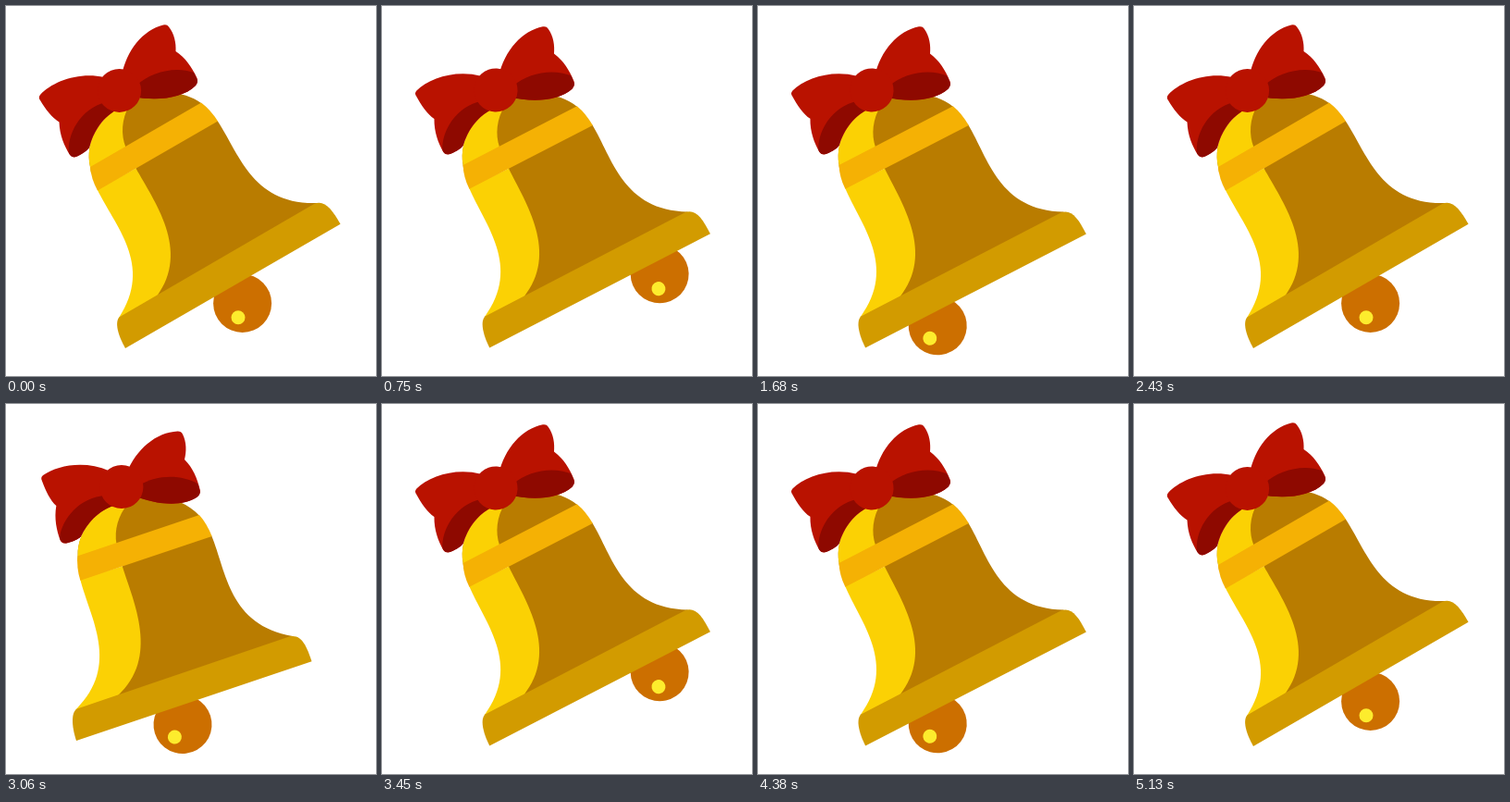
These frames come from a looping animation (400 by 400 pixels, 5400 ms). An HTML page with a canvas:

```html
<!DOCTYPE html>
<html lang="en">
<head>
<meta charset="utf-8">
<title>Ringing bell</title>
<style>
  html, body { margin: 0; width: 100%; height: 100%; overflow: hidden; background: #fff; }
  canvas { display: block; width: 400px; height: 400px; }
</style>
</head>
<body>
<canvas id="stage"></canvas>
<script>
const STEP = 30, STEPS = 90;
const PIVOT = [133, 102];

// [step, degrees] swing keys; the clapper swings relative to the bell
const BELL = [[0, 0], [9, 22], [19, -27], [29.5, 22], [40, -28], [51, 11], [61, -5.5], [75, 0]];
const CLAPPER = [[0, 0], [6, -15], [16, 15], [25, -15.2], [35.5, 15], [46, -15], [57, 13], [67, -4.7], [81, 0]];

const shape = (fill, d) => ({ fill, path: new Path2D(d) });

const DOME = 'M91 174 C85 146 101 120 130 105 ';
const bellShapes = [
  // dome
  shape('#b97c00', DOME + 'C165 88 193 92 211 105 L212 110 L92 180 Z'),
  shape('#fbd104', DOME + 'L133 108 C125 122 124 139 129.500 153 L129 158 L92 180 Z'),
  // body
  shape('#b97c00', 'M140 172 L228.500 124 C252 159 266 215 336 213 L336 220 L160 322 Z'),
  shape('#fbd104', 'M98.500 198 L140.500 175.500 C160 211 200 264 163 314 L160 322 L121 340 L122 337 C160 278 117 237 98.500 198 Z'
    .replace('C160 278 117 237', 'C160 280 117 237')),
  // band
  shape('#f5b104', 'M91 174 L211 104.500 Q221 112 229 124.500 L99 199.500 Q92 187 91 174 Z'),
  // rim
  shape('#d29b00', 'M129 370 L361.500 235.700 C352 219 344 209 333 214 L123 336 C117 341 121 356 129 370 Z')
];

const bowShapes = [
  // left loop
  shape('#b91200', 'M122 76 L106 77 C78 71 50 82 37 96 Q34.500 99 37 102 C43 112 50 121 57.500 125.500 C58 140 63 151 69 161 Q72 165 77 162.500 C84 159 88 156 90 153 C94 138 102 123 118 113 Z'),
  shape('#8e0900', 'M68 159 C66 139 80 111 108 104 L122 111 C105 119 94 135 90 153 C88 156 84 159 77 162.500 Q71 165 68 159 Z'),
  // right loop
  shape('#b91200', 'M125 76 C130 48 148 26 170 20.500 Q174 19.500 176 22.500 C182 30 184 40 183.500 49 C194 56 201 66 206.500 78 Q208 82 205 86 C191 100 163 103 139 98 Z'),
  shape('#8e0900', 'M141 86 C157 71 183 65 203 72 L206.500 79 Q208 82 205 86 C191 100 163 103 136 98 Z')
];

const canvas = document.getElementById('stage');
const ctx = canvas.getContext('2d');
const ratio = window.devicePixelRatio || 1;
canvas.width = canvas.height = 400 * ratio;

function valueAt(keys, t) {
  for (let i = 1; i < keys.length; i++) {
    const [t0, a] = keys[i - 1], [t1, b] = keys[i];
    if (t < t1) {
      const u = (t - t0) / (t1 - t0);
      return a + (b - a) * u * u * (3 - 2 * u);
    }
  }
  return keys[keys.length - 1][1];
}

function disc(x, y, r, fill) {
  ctx.fillStyle = fill;
  ctx.beginPath();
  ctx.arc(x, y, r, 0, Math.PI * 2);
  ctx.fill();
}

function swing(deg, paint) {
  const [x, y] = PIVOT;
  ctx.save();
  ctx.translate(x, y);
  ctx.rotate(deg * Math.PI / 180);
  ctx.translate(-x, -y);
  paint();
  ctx.restore();
}

function paintAll(shapes) {
  for (const s of shapes) {
    ctx.fillStyle = s.fill;
    ctx.fill(s.path);
  }
}

function draw(step) {
  ctx.setTransform(ratio, 0, 0, ratio, 0, 0);
  ctx.fillStyle = '#fff';
  ctx.fillRect(0, 0, 400, 400);
  swing(valueAt(BELL, step), () => {
    swing(valueAt(CLAPPER, step), () => {
      disc(255.6, 321.4, 31.5, '#cc6f00');
      disc(251, 336.7, 7.5, '#fdec2d');
    });
    paintAll(bellShapes);
    paintAll(bowShapes);
    disc(122.6, 91.4, 23.5, '#b91200');
  });
}

const start = performance.now();
function tick() {
  const t = Math.max(0, performance.now() - start);
  draw(Math.floor(t / STEP) % STEPS);
  requestAnimationFrame(tick);
}
tick();
</script>
</body>
</html>
```
